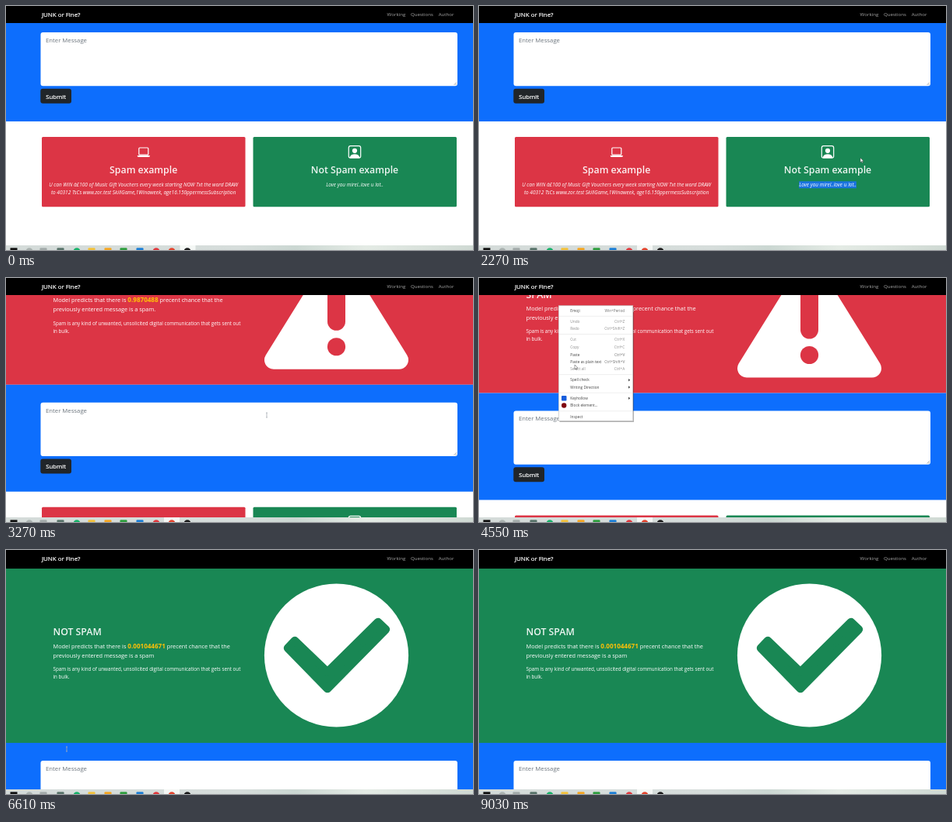
An HTML page for the animation above (9060 ms loop, 600 by 315 pixels).

```html
<!DOCTYPE html>
<html lang="en">
<head>
<meta charset="utf-8">
<title>Message checker</title>
<style>
html, body { margin: 0; width: 100%; height: 100%; overflow: hidden; background: #fff; }
svg { display: block; width: 600px; height: 315px; font-family: "Open Sans", "Noto Sans", sans-serif; fill: #fff; }
.brand { font-size: 7.9px; }
.strong { stroke: #fff; stroke-width: .22px; }
.link { font-size: 6.15px; fill: #a4a4a4; text-anchor: end; }
.title { font-size: 12.3px; font-weight: 600; fill-opacity: .92; }
.lead { font-size: 7.35px; }
.score { font-size: 8.1px; font-weight: 700; fill: #ffc107; }
.small { font-size: 6.24px; }
.input { font-size: 7.75px; }
.sample { font-size: 6.5px; font-style: italic; }
.mid { text-anchor: middle; }
.line { fill: none; stroke: #fff; }
#menu { font-size: 4.75px; }
</style>
</head>
<body>
<svg viewBox="0 0 600 315">
  <defs>
    <linearGradient id="glass">
      <stop offset="0" stop-color="#d4dbd9"/>
      <stop offset=".5" stop-color="#d6dddb"/>
      <stop offset=".62" stop-color="#cbd7d2"/>
      <stop offset=".77" stop-color="#e4ebe5"/>
      <stop offset="1" stop-color="#cfd9d3"/>
    </linearGradient>
  </defs>
  <rect width="600" height="315"/>

  <g id="page">
    <rect width="600" height="24" fill="#000"/>
    <g id="bad">
      <rect y="24" width="600" height="225" fill="#dc3545"/>
      <g transform="translate(0 15.7)">
        <text class="title" x="60.5" y="111">SPAM</text>
        <text class="lead" x="60.5" y="126.7">Model predicts that there is <tspan class="score">0.9870488</tspan> precent chance that the</text>
        <text class="lead" x="60.5" y="138.7">previously entered message is a spam.</text>
        <text class="small" x="60.5" y="156.3">Spam is any kind of unwanted, unsolicited digital communication that gets sent out</text>
        <text class="small" x="60.5" y="166.3">in bulk.</text>
      </g>
      <path d="M344 217H505L424.5 87Z" stroke="#fff" stroke-width="24" stroke-linejoin="round"/>
      <path d="M424.5 112V167.5" stroke="#dc3545" stroke-width="23" stroke-linecap="round"/>
      <circle cx="424.5" cy="200" r="11.6" fill="#dc3545"/>
    </g>
    <g id="good">
      <rect y="24" width="600" height="225" fill="#198754"/>
      <text class="title" x="60.5" y="110.4">NOT SPAM</text>
      <text class="lead" x="60.5" y="126.7">Model predicts that there is <tspan class="score">0.001044671</tspan> precent chance that the</text>
      <text class="lead" x="60.5" y="138.7">previously entered message is a spam</text>
      <text class="small" x="60.5" y="156.3">Spam is any kind of unwanted, unsolicited digital communication that gets sent out</text>
      <text class="small" x="60.5" y="166.3">in bulk.</text>
      <circle cx="424.5" cy="136" r="92.6"/>
      <path d="M362 126.5L371 117L413 157.5L478 93L488 102.5L413 179Z" fill="#198754" stroke="#198754" stroke-width="10.5" stroke-linejoin="round"/>
    </g>

    <rect y="249" width="600" height="138" fill="#0d6efd"/>
    <rect x="44.5" y="272" width="535.5" height="69.3" rx="3"/>
    <path d="M575.5 340L579 336.5M577.5 340L579 338.5" stroke="#777" stroke-width=".6"/>
    <text id="field" class="input" x="51" y="284.8"></text>
    <rect x="44.3" y="344.8" width="39.7" height="19" rx="3" fill="#212529"/>
    <text class="input mid strong" x="64.2" y="357.5">Submit</text>

    <rect x="46" y="407" width="261.5" height="90.3" rx="1.5" fill="#dc3545"/>
    <rect x="170.8" y="421" width="12" height="9.2" rx="1" class="line" stroke-width="1.2"/>
    <path d="M168.8 431H184.8V431.5Q184.8 433 183.3 433H170.3Q168.8 433 168.8 431.5Z"/>
    <text class="title mid" x="176.7" y="454.4">Spam example</text>
    <text class="sample mid" x="176.7" y="471.3">U can WIN â£100 of Music Gift Vouchers every week starting NOW Txt the word DRAW</text>
    <text class="sample mid" x="176.7" y="481.3">to 40312 TsCs www.zor.test SkillGame,1Winaweek, age16.150ppermessSubscription</text>

    <rect x="317.5" y="407" width="261.5" height="90.3" rx="1.5" fill="#198754"/>
    <rect x="440.3" y="418.7" width="15.4" height="15.4" rx="2.3" class="line" stroke-width="1.2"/>
    <circle cx="448" cy="424.8" r="3.1"/>
    <path d="M442 434V432.5Q443.5 429.2 448 429.2T454 432.5V434Z"/>
    <text class="title mid" x="448" y="454.4">Not Spam example</text>
    <rect id="mark" y="464.3" height="9" fill="#1a73e0"/>
    <text id="note" class="sample mid" x="448" y="471.3">Love you mirel..love u lot..</text>
  </g>

  <rect width="600" height="22" fill="#000"/>
  <text class="brand strong" x="46" y="13.7">JUNK or Fine?</text>
  <text class="link" x="513.3" y="13.1">Working</text>
  <text class="link" x="549" y="13.1">Questions</text>
  <text class="link" x="575.5" y="13.1">Author</text>

  <g id="menu">
    <rect x="103.5" y="37" width="95.5" height="149" fill="#000" fill-opacity=".3"/>
    <rect x="102.3" y="35.7" width="95.5" height="148.8" stroke="#bbb" stroke-width=".6"/>
    <rect x="106" y="152" width="6.5" height="6.5" rx="1" fill="#175ddc"/>
    <circle cx="109.2" cy="164.5" r="3.2" fill="#800610"/>
  </g>

  <g id="bar">
    <rect y="309" width="600" height="6" fill="url(#glass)"/>
    <rect id="active" y="309" width="20" height="6" fill="#f4f7f5"/>
  </g>

  <g id="cursor">
    <path id="arrow" d="M0 0V5.8L1.4 4.6L2.3 6.5L3.2 6.1L2.3 4.2H4.1Z" stroke="#444" stroke-width=".5"/>
    <path id="beam" d="M-1 -3H1M0 -3V3M-1 3H1" stroke="#a8adb3" stroke-width=".8"/>
  </g>
</svg>
<script>
const $ = id => document.getElementById(id);
const LOOP = 9060, PASTE = 4770, RESULT = 6470;
const MESSAGE = $('note').textContent;
const noteWidth = $('note').getComputedTextLength();

function add(parent, tag, attrs, text = '') {
  const el = document.createElementNS('http://www.w3.org/2000/svg', tag);
  for (const key in attrs) el.setAttribute(key, attrs[key]);
  el.textContent = text;
  parent.append(el);
}

// label, middle height, shortcut ('>' opens a submenu), disabled
[
  ['Emoji', 42.3, 'Win+Period'],
  ['Undo', 56.3, 'Ctrl+Z', 1], ['Redo', 65.7, 'Ctrl+Shift+Z', 1],
  ['Cut', 79.7, 'Ctrl+X', 1], ['Copy', 89.2, 'Ctrl+C', 1],
  ['Paste', 98.8, 'Ctrl+V'], ['Paste as plain text', 108, 'Ctrl+Shift+V'],
  ['Select all', 117.5, 'Ctrl+A', 1],
  ['Spell check', 131.7, '>'], ['Writing Direction', 141, '>'],
  ['Keyhollow', 155.2, '>'], ['Block element...', 164.6, ''],
  ['Inspect', 178.8, '']
].forEach(([label, y, key, off]) => {
  const fill = off ? '#8c8c8c' : '#444', base = y + 1.7;
  add($('menu'), 'text', { x: 117.3, y: base, fill }, label);
  if (key === '>') add($('menu'), 'path', { d: `M192 ${y - 1.7}l2.2 1.7l-2.2 1.7Z`, fill });
  else add($('menu'), 'text', { x: 187.3, y: base, fill: off ? '#8c8c8c' : '#707070', 'text-anchor': 'end' }, key);
});
for (const y of [49.3, 72.6, 124.7, 148.2, 171.8])
  add($('menu'), 'path', { d: `M103 ${y}H197`, stroke: '#ddd', 'stroke-width': .5 });

// taskbar icons: middle, colour, corner radius
[
  [10, '#111', 0], [30, '#aab2b0', 5], [48, '#a3abaa', 1], [70, '#59746b', 1],
  [91, '#17b26a', 5], [110, '#f3c23c', 1], [131, '#f5a623', 1], [151, '#2f9e3f', 1],
  [172, '#1d7fd6', 1], [193, '#e0393e', 5], [213, '#e3452f', 5], [233, '#1c1c1c', 5]
].forEach(([x, fill, rx]) =>
  add($('bar'), 'rect', { x: x - 4.5, y: 312.3, width: 9, height: 9, rx, fill }));

const path = [
  [0, 236, 320], [250, 236, 320], [900, 411, 231], [980, 411, 231], [1180, 485, 231],
  [1290, 483, 255], [1500, 483, 255], [1800, 490, 196], [2300, 490, 196], [2700, 489, 158],
  [3020, 489, 158], [3270, 335, 177], [3800, 112, 185], [4050, 103, 184], [4250, 103, 184],
  [4550, 123, 112], [4680, 122, 99], [4800, 122, 99], [5250, 66, 253], [6350, 66, 253],
  [6600, 78, 257], [7360, 78, 257], [7700, 180, 124], [7950, 300, 150], [8240, 236, 320],
  [LOOP, 236, 320]
];
const clamp = u => Math.min(1, Math.max(0, u));
const smooth = u => u * u * (3 - 2 * u);

function cursorAt(t) {
  const i = path.findIndex(p => p[0] > t);
  const [t0, x0, y0] = path[i - 1], [t1, x1, y1] = path[i];
  const u = smooth((t - t0) / (t1 - t0));
  return [x0 + (x1 - x0) * u, y0 + (y1 - y0) * u];
}

const show = (id, on) => $(id).setAttribute('display', on ? 'inline' : 'none');

function draw(t) {
  const done = t >= RESULT;
  const menu = t >= 4130 && t < PASTE;
  const scroll = done ? 0 : 100.5 + 137.5 * (1 - clamp((t - 3050) / 386)) ** 3;
  $('page').setAttribute('transform', `translate(0 ${-scroll})`);
  show('bad', !done);
  show('good', done);
  show('menu', menu);

  const pasted = t >= PASTE && !done;
  $('field').textContent = pasted ? MESSAGE : 'Enter Message';
  $('field').setAttribute('fill', pasted ? '#212529' : '#6c757d');

  $('mark').setAttribute('x', 448 - noteWidth / 2);
  $('mark').setAttribute('width', done ? 0 : noteWidth * smooth(clamp((t - 980) / 200)));
  $('active').setAttribute('x', t < 950 ? 223.5 : 203);

  const [x, y] = cursorAt(t);
  const inField = x > 45 && x < 580 && y > 272 - scroll && y < 341 - scroll;
  const beam = !menu && (inField || (done && t < 7700) || (t > 900 && t < 1180));
  $('cursor').setAttribute('transform', `translate(${x} ${y})`);
  show('beam', beam);
  show('arrow', !beam);
}

const start = performance.now();
function tick() {
  draw((performance.now() - start) % LOOP);
  requestAnimationFrame(tick);
}
tick();
</script>
</body>
</html>
```
